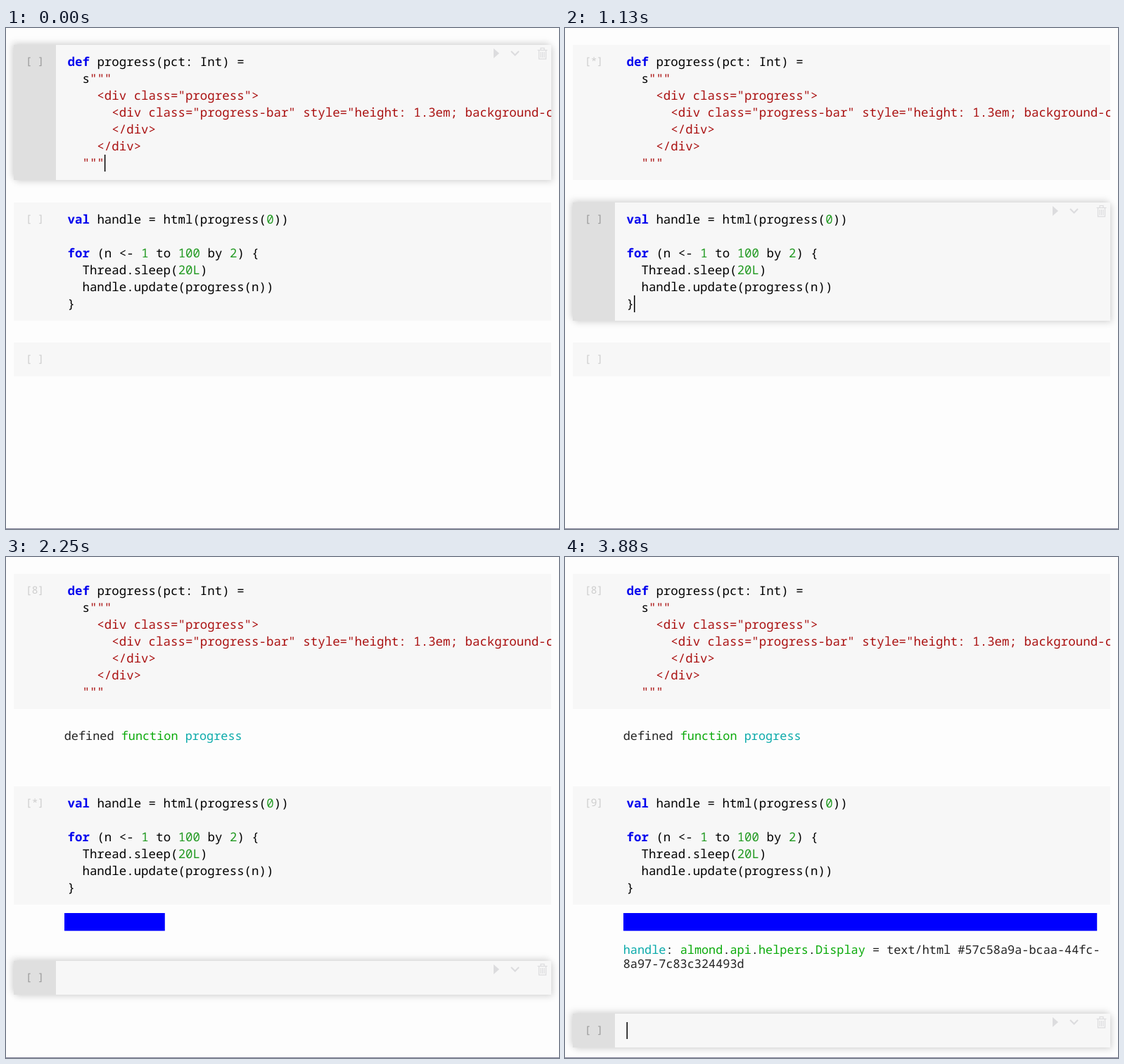
Write an HTML page with a canvas that moves like this. It is 786 px wide and 712 px high and loops after 3.93 s.

```html
<!DOCTYPE html>
<html lang="en">
<head>
<meta charset="utf-8">
<title>Notebook progress bar</title>
<style>
html, body { margin: 0; width: 100%; height: 100%; overflow: hidden; background: #fdfdfd; }
canvas { display: block; }
</style>
</head>
<body>
<canvas id="stage" width="786" height="712"></canvas>
<script>
const ctx = document.getElementById('stage').getContext('2d');
const LOOP = 3930, FPS = 24, LAST = 93, BLINK = 530;

// Moments of the session, in ms
const RUN_1 = 925, DONE_1 = 1200, RUN_2 = 1655, BAR = 1972, TICK_0 = 1996, TICK = 24.2, DONE_2 = 3200;

const LEFT = 11, RIGHT = 775, GUTTER = 60, LINE = 24, PAD = 12;
const CODE_X = 87.5, OUT_X = 82.7, BAR_X = 83, BAR_W = 680;
const CODE_PITCH = 10.475, OUT_PITCH = 10.12, PROMPT_PITCH = 8.7;

const INK = '#000', OUT = '#222', KEY = '#0000ee', STR = '#a11', NUM = '#229a22';
const GREEN = '#0aaa0a', CYAN = '#0aaaaa';
const FAMILY = '"Noto Sans Mono", "DejaVu Sans Mono", monospace';

ctx.textRendering = 'geometricPrecision';
ctx.font = '100px ' + FAMILY;
const charRatio = ctx.measureText('0').width / 100;

const num = s => [s, NUM], key = s => [s, KEY, 'bold'], str = s => [[s, STR]];

const DEF_CODE = [
  [key('def'), [' progress(pct: Int) =']],
  [['  s'], ['"""', STR]],
  str('    <div class="progress">'),
  str('      <div class="progress-bar" style="height: 1.3em; background-color'),
  str('      </div>'),
  str('    </div>'),
  str('  """')
];
const LOOP_CODE = [
  [key('val'), [' handle = html(progress('], num('0'), ['))']],
  [],
  [key('for'), [' (n <- '], num('1'), [' to '], num('100'), [' by '], num('2'), [') {']],
  [['  Thread.sleep('], num('20L'), [')']],
  [['  handle.update(progress(n))']],
  [['}']]
];
const DEF_OUT = [['defined ', OUT], ['function ', GREEN], ['progress', CYAN]];
const HANDLE_OUT = [
  ['handle', CYAN], [': ', OUT], ['almond', GREEN], ['.', OUT], ['api', GREEN], ['.', OUT],
  ['helpers', GREEN], ['.', OUT], ['Display', GREEN], [' = text/html #57c58a9a-bcaa-44fc-', OUT]
];
const HANDLE_END = [['8a97-7c83c324493d', OUT]];

function text(parts, x, y, pitch) {
  const size = pitch / charRatio;
  for (const [s, color = INK, weight = 'normal'] of parts) {
    ctx.font = `${weight} ${size}px ${FAMILY}`;
    ctx.fillStyle = color;
    ctx.fillText(s, x, y);
    x += s.length * pitch;
  }
}

function rect(x, y, w, h, color) {
  ctx.fillStyle = color;
  ctx.fillRect(x, y, w, h);
}

function shadow(x, y, w, h, shift, alpha) {
  ctx.save();
  ctx.shadowColor = `rgba(0,0,0,${alpha})`;
  ctx.shadowBlur = 9;
  ctx.shadowOffsetX = ctx.shadowOffsetY = shift;
  rect(x, y, w, h, '#f7f7f7');
  ctx.restore();
}

function toolbar(y) {
  ctx.fillStyle = ctx.strokeStyle = '#dcdcde';
  ctx.beginPath();
  ctx.moveTo(693, y - 7);
  ctx.lineTo(701, y);
  ctx.lineTo(693, y + 7);
  ctx.fill();

  ctx.lineWidth = 2;
  ctx.beginPath();
  ctx.moveTo(718, y - 3);
  ctx.lineTo(723.5, y + 2.5);
  ctx.lineTo(729, y - 3);
  ctx.stroke();

  ctx.lineWidth = 1.2;
  ctx.strokeRect(757.5, y - 4.5, 10, 12.5);
  ctx.strokeRect(760, y - 7.5, 5, 3);
  ctx.beginPath();
  ctx.moveTo(755.5, y - 4.5);
  ctx.lineTo(769.5, y - 4.5);
  for (const x of [760, 762.5, 765]) {
    ctx.moveTo(x, y - 2);
    ctx.lineTo(x, y + 6);
  }
  ctx.stroke();
}

function cell(top, code, mark, focused, caretCol, caretOn) {
  const rows = Math.max(code.length, 1), h = rows * LINE + 2 * PAD, w = RIGHT - LEFT;
  if (focused) {
    shadow(LEFT, top, w, h, 3, 0.12);
    shadow(LEFT, top, w, h, -3, 0.13);
  }
  rect(LEFT, top, w, h, '#f7f7f7');
  if (focused) rect(LEFT, top, GUTTER, h, '#dfdfdf');

  text([[`[${mark}]`, focused ? '#999' : '#cdcdcd']],
    LEFT + GUTTER / 2 - 1.5 * PROMPT_PITCH, top + 28, PROMPT_PITCH);

  ctx.save();
  ctx.beginPath();
  ctx.rect(LEFT, top, w, h);
  ctx.clip();
  code.forEach((parts, i) => text(parts, CODE_X, top + 30 + i * LINE, CODE_PITCH));
  ctx.restore();

  if (!focused) return;
  toolbar(top + 12);
  if (caretOn) rect(CODE_X + caretCol * CODE_PITCH, top + PAD + (rows - 1) * LINE, 1.5, LINE, INK);
}

function draw(t) {
  const focus = t < RUN_1 ? 1 : t < RUN_2 ? 2 : 3;
  const blinkStart = [-70, RUN_1, RUN_2][focus - 1];
  const caretOn = Math.floor((t - blinkStart) / BLINK) % 2 === 0;
  const shift = t < DONE_1 ? 0 : 78;
  const mark1 = t < RUN_1 ? ' ' : t < DONE_1 ? '*' : '8';
  const mark2 = t < RUN_2 ? ' ' : t < DONE_2 ? '*' : '9';
  const top3 = 447 + shift + (t < BAR ? 0 : 49) + (t < DONE_2 ? 0 : 75);

  rect(0, 0, 786, 712, '#fdfdfd');
  cell(24, DEF_CODE, mark1, focus === 1, 5, caretOn);
  cell(248 + shift, LOOP_CODE, mark2, focus === 2, 1, caretOn);
  cell(top3, [], ' ', focus === 3, 0, caretOn);

  if (t >= DONE_1) text(DEF_OUT, OUT_X, 260, OUT_PITCH);
  if (t >= TICK_0) {
    const n = Math.min(99, 1 + 2 * Math.floor((t - TICK_0) / TICK));
    rect(BAR_X, 506, BAR_W * n / 100, 25.3, '#0000ff');
  }
  if (t >= DONE_2) {
    text(HANDLE_OUT, OUT_X, 564, OUT_PITCH);
    text(HANDLE_END, OUT_X, 584, OUT_PITCH);
  }
  rect(0, 711, 786, 1, '#85859a');
}

// The picture advances in 24 fps steps, like a screen recording
function tick() {
  const step = Math.floor((performance.now() % LOOP + 4.9) * FPS / 1000);
  draw(Math.min(step, LAST) * 1000 / FPS);
  requestAnimationFrame(tick);
}
tick();
</script>
</body>
</html>
```
